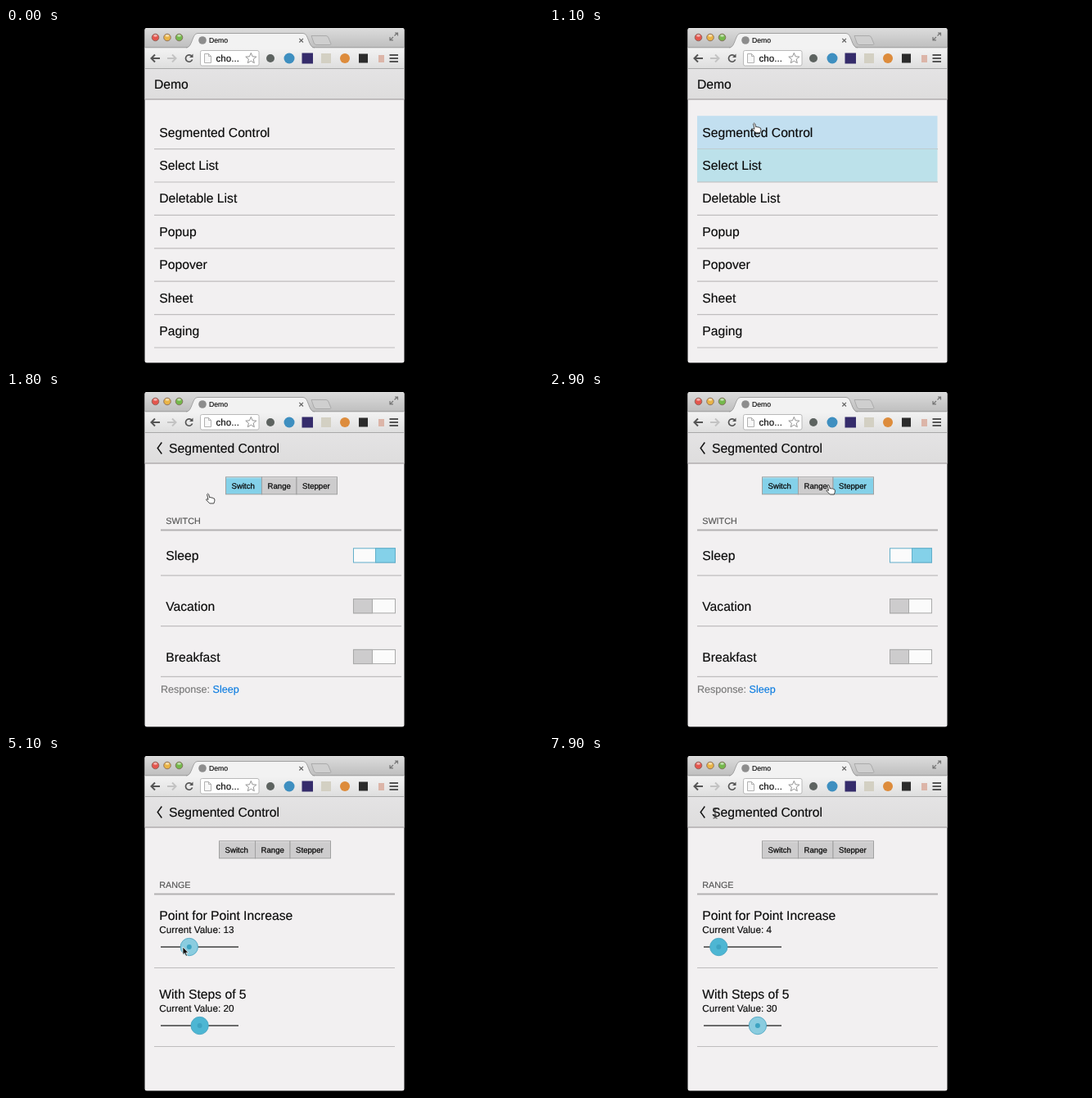
These frames come from a looping animation (656x410 px, 8000 ms). An HTML page:

```html
<!DOCTYPE html>
<html lang="en">
<head>
<meta charset="utf-8">
<title>Demo</title>
<style>
html, body { margin: 0; width: 100%; height: 100%; overflow: hidden; background: #000; }
svg { display: block; width: 656px; height: 410px; }
text {
  font-family: "Liberation Sans", Arial, sans-serif; font-size: 15.68px; fill: #0a0a0a;
  stroke: #0a0a0a; stroke-width: .15; white-space: pre; text-rendering: geometricPrecision;
}
.btn { font-size: 9.6px; stroke-width: .25; }
.sub { font-size: 11.75px; }
.cap { font-size: 10.75px; fill: #555; stroke: #555; }
.note { font-size: 12.55px; fill: #777; stroke: #777; }
.link { fill: #0a7be0; stroke: #0a7be0; }
.rule { stroke: #bfbdbe; stroke-width: 1.2; }
.track { stroke: #6a6a6a; stroke-width: 2; }
</style>
</head>
<body>
<svg id="stage" viewBox="0 0 656 410" xmlns="http://www.w3.org/2000/svg">
  <defs>
    <linearGradient id="strip" x2="0" y2="1"><stop stop-color="#dcdcdc"/><stop offset="1" stop-color="#bdbdbd"/></linearGradient>
    <linearGradient id="bar" x2="0" y2="1"><stop stop-color="#f3f3f3"/><stop offset="1" stop-color="#dedede"/></linearGradient>
    <linearGradient id="head" x2="0" y2="1"><stop stop-color="#e4e3e4"/><stop offset="1" stop-color="#dedddd"/></linearGradient>
    <clipPath id="win"><rect x="169.5" y="0" width="317" height="408.5" rx="2.5"/></clipPath>
    <clipPath id="body"><rect x="169" y="87" width="318" height="322"/></clipPath>
  </defs>
  <g clip-path="url(#win)">
    <rect x="169" width="318" height="410" fill="#f2f0f1"/>
    <g clip-path="url(#body)">
      <g id="list"></g>
      <g id="page"><g id="buttons"></g><g id="switches"></g><g id="ranges"></g></g>
    </g>
    <g id="header">
      <rect x="169" y="50" width="318" height="37" fill="url(#head)"/>
      <path d="M169 87H487" stroke="#b0aeaf" stroke-width="1.6"/>
      <text id="home" x="181" y="74">Demo</text>
      <g id="detail">
        <path d="M190.3 61.5L185.2 68.5L190.3 75.5" fill="none" stroke="#111" stroke-width="1.5"/>
        <text x="199" y="74">Segmented Control</text>
      </g>
    </g>
    <g id="chrome">
      <rect x="169" width="318" height="25" fill="url(#strip)"/>
      <rect x="169" y="24" width="318" height="26" fill="url(#bar)"/>
      <path d="M169 49.5H487" stroke="#a9a9a9"/>
      <path d="M169 23.8H222" stroke="#9c9c9c"/>
      <path d="M374 23.8H487" stroke="#9c9c9c"/>
      <path d="M220 24.5C228 24 227 6.5 234 6.5H363C370 6.5 369 24 377 24.5Z" fill="#f2f2f2"/>
      <path d="M220 24C228 24 227 6.5 234 6.5H363C370 6.5 369 24 377 24" fill="none" stroke="#9a9a9a" stroke-width=".9"/>
      <path d="M373 9.5H391Q393 9.5 394 12L397 19.5Q397 20.5 395 20.5H379Q377 20.5 376 18Z" fill="#cfcfcf" stroke="#a2a2a2" stroke-width=".8"/>
      <text x="248" y="18" style="font-size:8.7px">Demo</text>
      <path d="M358.3 12.8L363 17.5M363 12.8L358.3 17.5" stroke="#666" stroke-width="1.2"/>
      <path d="M474.5 9.5L478 6M475 6H478.5V9.5M473 11L469.5 14.5M469 11V14.8H473" fill="none" stroke="#777" stroke-width="1.2"/>
      <path d="M188 37H178M182 32.5L177.5 37L182 41.5" fill="none" stroke="#555" stroke-width="2"/>
      <path d="M197 37H207M203 32.5L207.5 37L203 41.5" fill="none" stroke="#c3c3c3" stroke-width="2"/>
      <path d="M227 34.5A4.2 4.2 0 1 0 227.6 38.5" fill="none" stroke="#555" stroke-width="1.7"/>
      <path d="M228.5 31.5V36H224Z" fill="#555"/>
      <rect x="237.5" y="27.5" width="71.5" height="18.5" rx="2" fill="#fff" stroke="#b3b3b3" stroke-width=".9"/>
      <path d="M242.5 31.5H247.5L250.5 34.5V42.5H242.5ZM247.5 31.5V34.5H250.5" fill="#f8f8f8" stroke="#aaa" stroke-width=".9"/>
      <text x="256.5" y="41" style="font-size:11.6px">cho...</text>
      <path id="star" fill="#fff" stroke="#888" stroke-width=".9"/>
      <path d="M468.5 33H479M468.5 37H479M468.5 41H479" stroke="#555" stroke-width="2"/>
    </g>
    <g id="cursor" stroke-linejoin="round">
      <path id="hand" fill="#fff" stroke="#333" transform="translate(-1 0) scale(.92)" d="M-1 1Q0 -.8 1.2 1L2.5 5.5L3.5 4.8L5 5.6L6 5.2L7.3 6.3L8.3 6.2Q9.6 7.5 9 10L8 13H2.5L-2 8.5Q-2.3 7 -.8 7.3L.6 8Z"/>
      <path id="arrow" fill="#111" stroke="#fff" stroke-width=".7" d="M0 0V9.5L2.2 7.5L3.9 11.3L5.5 10.6L3.9 7H6.8Z"/>
      <path id="beam" fill="none" stroke="#333" d="M-2.5 -6Q0 -6 0 -4.5Q0 -6 2.5 -6M0 -4.5V4.5M-2.5 6Q0 6 0 4.5Q0 6 2.5 6M-1.5 2H1.5"/>
    </g>
  </g>
</svg>
<script>
const LOOP = 8000, STEP = 100, WIDTH = 318, ROW = 40.4;
const $ = id => document.getElementById(id);

function add(parent, tag, attrs, text) {
  const el = document.createElementNS('http://www.w3.org/2000/svg', tag);
  for (const k in attrs) el.setAttribute(k, attrs[k]);
  if (text) el.textContent = text;
  return parent.appendChild(el);
}
const label = (p, x, y, text, cls = '') => add(p, 'text', { x, y, class: cls }, text);
const rule = (p, y) => add(p, 'path', { d: `M181 ${y}H475`, class: 'rule' });
const box = (p, x, y, width, height, fill, stroke = 'none') =>
  add(p, 'rect', { x, y, width, height, fill, stroke });
const dot = (p, cx, cy, r, fill) => add(p, 'circle', { cx, cy, r, fill });
const show = (el, on) => el.setAttribute('opacity', +on);
const move = (el, x, y) => el.setAttribute('transform', `translate(${x} ${y})`);

// Linear value from rows of [time, ...values]
function at(track, t, col = 1) {
  const i = track.findIndex(k => k[0] > t);
  if (i === 0) return track[0][col];
  if (i < 0) return track[track.length - 1][col];
  const a = track[i - 1], b = track[i];
  return a[col] + (b[col] - a[col]) * (t - a[0]) / (b[0] - a[0]);
}

// Browser frame details
['#e4564e', '#e9b447', '#74b84c'].forEach((c, i) => {
  const light = dot($('chrome'), 182.5 + i * 14.5, 11.5, 4.3, c);
  light.setAttribute('stroke', '#7d6055');
  light.setAttribute('stroke-width', .8);
  add($('chrome'), 'ellipse', { cx: 182.5 + i * 14.5, cy: 9.4, rx: 2.2, ry: 1.3, fill: '#fff', opacity: .55 });
});
dot($('chrome'), 240, 15, 4.8, '#8d8d8d');
dot($('chrome'), 323, 37, 5, '#5d6360');
dot($('chrome'), 346, 37, 6.5, '#3e8fc0');
box($('chrome'), 361.5, 30.5, 13.5, 13, '#352c6b');
box($('chrome'), 385, 31, 12, 12, '#d3d0c3');
dot($('chrome'), 414, 37, 6, '#dd8c3c');
box($('chrome'), 431, 31.5, 11, 11, '#2b2b2b');
box($('chrome'), 455, 33, 7, 9, '#dcb5a8');
$('star').setAttribute('d', 'M' + Array.from({ length: 10 }, (_, i) => {
  const r = i % 2 ? 3 : 6.8, a = i * Math.PI / 5;
  return (299.3 + r * Math.sin(a)).toFixed(1) + ' ' + (37.2 - r * Math.cos(a)).toFixed(1);
}).join('L') + 'Z');

// Menu
const names = ['Segmented Control', 'Select List', 'Deletable List', 'Popup', 'Popover', 'Sheet', 'Paging'];
const rows = names.map((name, i) => {
  const y = 107.2 + i * ROW;
  const lit = box($('list'), 181, y, 293.5, ROW, i ? '#bce1ea' : '#c2dff0');
  rule($('list'), y + ROW);
  label($('list'), 187.3, y + 25.4, name);
  return lit;
});

// Segmented buttons
const buttons = [['Switch', 260.5, 44], ['Range', 304.5, 42.5], ['Stepper', 347, 49.5]].map(([name, x, w]) => {
  const face = box($('buttons'), x, 103.8, w, 21, '#cdcccd', '#a0a0a0');
  add($('buttons'), 'path', { d: `M${x + .5} 104.8H${x + w - .5}`, stroke: '#fff', opacity: .4 });
  label($('buttons'), x + 7.1, 118, name, 'btn');
  return face;
});

function heading(p, text) {
  label(p, 187.3, 161, text, 'cap');
  add(p, 'path', { d: 'M181 168.5H475', stroke: '#b3b1b2', 'stroke-width': 2 });
}

// Switch panel
const sw = $('switches');
heading(sw, 'SWITCH');
['Sleep', 'Vacation', 'Breakfast'].forEach((name, i) => {
  const y = 190.8 + i * 61.8, on = i === 0;
  label(sw, 187.3, y + 14.6, name);
  box(sw, 416.5, y, 51, 17.2, '#fbfbfb', on ? '#62aeca' : '#a9a9a9');
  if (on) box(sw, 443.5, y, 24, 17.2, '#84d1e9', '#62aeca');
  else box(sw, 416.5, y, 23, 17.2, '#cdcccd', '#a9a9a9');
  rule(sw, y + 33);
});
label(sw, 181, 367, 'Response: ', 'note');
label(sw, 244.6, 367, 'Sleep', 'note link');

// Range panel
heading($('ranges'), 'RANGE');
const sliders = ['Point for Point Increase', 'With Steps of 5'].map((name, i) => {
  const g = add($('ranges'), 'g', { transform: `translate(0 ${i * 96})` });
  label(g, 187.3, 199.5, name);
  const value = label(g, 187.3, 215.5, ' ', 'sub');
  add(g, 'path', { d: 'M189 233H284', class: 'track' });
  const thumb = add(g, 'g', {});
  const disc = dot(thumb, 0, 0, 10.7, '#4db6d3');
  disc.setAttribute('stroke', '#48a3bf');
  disc.setAttribute('stroke-width', .8);
  dot(thumb, 0, 0, 3, '#3da3c2');
  rule(g, 258.5);
  return { value, thumb, disc };
});

function setSlider(s, v, focus) {
  s.value.textContent = 'Current Value: ' + v;
  move(s.thumb, 200 + 1.83 * v, 233);
  s.disc.setAttribute('fill', focus ? '#8accdf' : '#4db6d3');
}

// Pointer tip: time, x, y
const path = [
  [400, 290, 398], [500, 285, 358], [1100, 251.5, 116], [1300, 250, 118], [1800, 247.5, 124],
  [2200, 247.5, 124], [2400, 285, 140], [2600, 345, 133], [2750, 361, 117], [2900, 342, 113],
  [3100, 328, 113], [3900, 327, 114], [4100, 318, 130], [4400, 265, 200], [4700, 237, 232],
  [4850, 234, 233], [5100, 216, 233], [5400, 206, 234], [5500, 207, 236], [5700, 231, 314],
  [5900, 238, 327], [6200, 238, 327], [6500, 228, 326], [6700, 228, 326], [7000, 256, 329],
  [7100, 256, 329], [7200, 262, 315], [7400, 296, 207], [7500, 296, 207], [7600, 272, 170],
  [7700, 240, 125], [7800, 215, 88], [7900, 203, 70]
];
const first = [[4800, 20], [5100, 13], [5400, 4]];
const second = [[6200, 20], [6400, 15], [6700, 15], [7000, 30]];

function render(t) {
  // Menu hover runs upward, one row per step
  rows.forEach((row, i) => {
    const e = 1100 - 100 * i;
    show(row, at([[e - 50, 0], [e, 1], [e + 100, 1], [e + 200, i ? 0 : 1]], t));
  });

  let slide = t < 1300 ? WIDTH : WIDTH * Math.exp(-(t - 1300) / 135.7);
  if (t >= 2100) slide = 0;
  move($('list'), slide - WIDTH, 0);
  move($('page'), slide, 0);
  const fade = at([[1300, 0], [1600, 1]], t);
  show($('home'), 1 - fade);
  show($('detail'), fade);

  const ranged = t >= 3200;
  show(sw, !ranged);
  show($('ranges'), ranged);
  const lit = [!ranged, t >= 3000 && t < 4100, t >= 2600 && t < 3000];
  buttons.forEach((b, i) => b.setAttribute('fill', lit[i] ? '#84d1e9' : '#cdcccd'));

  setSlider(sliders[0], Math.round(at(first, t)), t >= 4800 && t < 6200);
  setSlider(sliders[1], Math.round(at(second, t) / 5) * 5, t >= 6200);

  const kind = t < 4200 ? 'hand' : t < 7800 ? 'arrow' : 'beam';
  ['hand', 'arrow', 'beam'].forEach(id => show($(id), id === kind));
  show($('cursor'), t >= 400);
  move($('cursor'), at(path, t, 1), at(path, t, 2));
}

const start = performance.now();
function tick(now) {
  const t = Math.max(0, now - start) % LOOP;
  render(Math.floor(t / STEP) * STEP);
  requestAnimationFrame(tick);
}
render(0);
requestAnimationFrame(tick);
</script>
</body>
</html>
```
